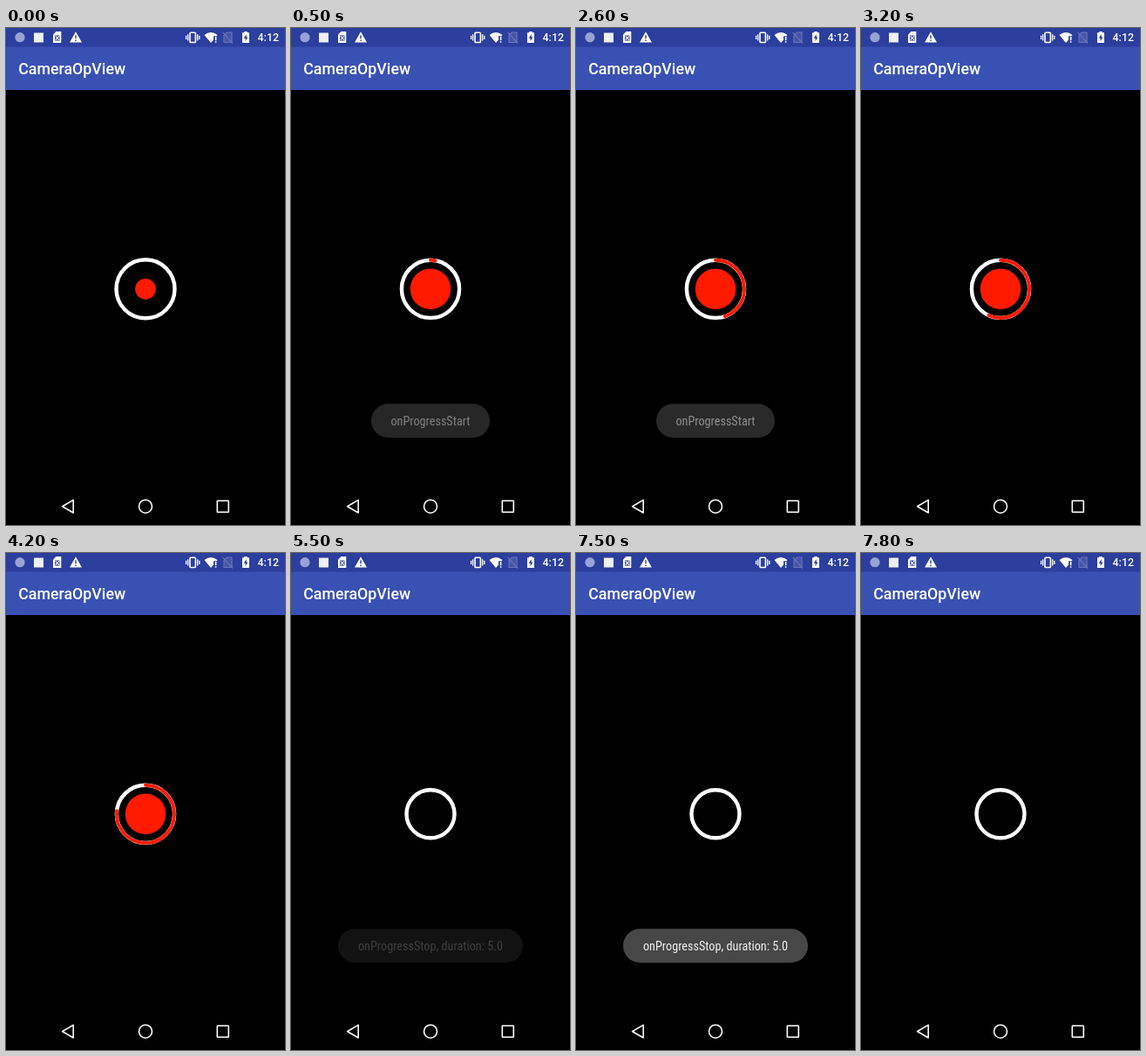
Recreate the animation shown at these times as an HTML page. Size 320 by 569 pixels, loop 8000 ms.

```html
<!DOCTYPE html>
<html lang="en">
<head>
<meta charset="utf-8">
<title>CameraOpView</title>
<style>
  html, body { margin: 0; height: 100%; overflow: hidden; background: #000; }
  svg { display: block; width: 100vw; height: 100vh; font-family: Roboto, sans-serif; }
  .line { fill: none; stroke: #fff; stroke-width: 1.6; }
  .toast text {
    font: 14.2px "Roboto Condensed", Roboto, sans-serif;
    font-stretch: condensed;
    fill: #fff;
    text-anchor: middle;
  }
  .toast rect { fill: #4c4c4c; }
</style>
</head>
<body>
<svg viewBox="0 0 320 569">
  <rect width="320" height="569"/>
  <rect width="320" height="71" fill="#3a51b4"/>
  <rect width="320" height="21.5" fill="#2c3e9e"/>
  <text x="14.2" y="53" font-size="17.8" font-weight="500" fill="#fff">CameraOpView</text>

  <!-- status bar -->
  <g fill="#fff">
    <circle cx="16" cy="10.7" r="5.6" fill="#98a2d4"/>
    <rect x="32" y="5.5" width="11" height="11" fill="#eef0fa"/>
    <path d="M57.5 4H63.3V17H54V7.5Z"/>
    <path d="M56 8.5H61.5V14.5H56Z" fill="#2c3e9e"/>
    <path d="M56.7 9.3L60.8 13.7M60.8 9.3L56.7 13.7" class="line" style="stroke-width:1.2"/>
    <path d="M80 4.3L87 16.5H73Z"/>
    <path d="M80 8.3V12.3M80 13.5V15" stroke="#2c3e9e" stroke-width="1.4"/>
    <rect x="211" y="5.3" width="6.4" height="11.2" rx=".8" class="line"/>
    <path d="M208.7 7.3V14.5M206.6 8.8V13M219.7 7.3V14.5M221.8 8.8V13" class="line" style="stroke-width:1.3"/>
    <path d="M227.5 8Q235 2.2 242.5 8L241.5 9.3H238V13.4L235 17Z"/>
    <path d="M240.6 10V14.2M240.6 15.3V16.8" class="line"/>
    <g stroke="#6974b8" fill="none" stroke-width="1.2">
      <path d="M253.5 5H259V16.5H250V8.5Z" fill="#4654a8"/>
      <path d="M248.7 5L260 17.5"/>
    </g>
    <path d="M271 5.3H273.3V4H276.7V5.3H279V17H271Z"/>
    <path d="M275.7 7L272.7 11.7H274.6V15.3L277.4 10.5H275.7Z" fill="#2c3e9e"/>
    <text x="313" y="15.3" font-size="12.4" font-weight="500" text-anchor="end">4:12</text>
  </g>

  <!-- record button -->
  <g transform="translate(160 298.8)" fill="none">
    <circle id="ring" stroke="#fff" stroke-width="4.4"/>
    <path id="arc" stroke="#ff1a00" stroke-width="3.9" stroke-linecap="round"/>
    <circle id="dot" fill="#ff1a00"/>
  </g>

  <g id="startToast" class="toast">
    <rect x="92" y="430.3" width="136" height="38.8" rx="19.4"/>
    <text x="160" y="454.8">onProgressStart</text>
  </g>
  <g id="stopToast" class="toast">
    <rect x="54" y="430.3" width="212" height="38.8" rx="19.4"/>
    <text x="160" y="454.8">onProgressStop, duration: 5.0</text>
  </g>

  <!-- navigation bar -->
  <g class="line">
    <path d="M64.6 547.7L77.2 540.4V555Z" stroke-linejoin="round"/>
    <circle cx="160" cy="547.7" r="7.5"/>
    <rect x="242.3" y="541.2" width="13" height="13" rx=".5"/>
  </g>
</svg>
<script>
const LOOP = 8000, START = 365, STOP = 5365;
const RING_IDLE = 27.5, RING_ACTIVE = 33.1, DOT = 23.3;
const $ = id => document.getElementById(id);
const ring = $("ring"), arc = $("arc"), dot = $("dot");
const progress = (t, from, length) => Math.min(1, Math.max(0, (t - from) / length));
const mix = (a, b, p) => a + (b - a) * p;

// Without a condensed face, a smaller regular one keeps the label inside its pill.
for (const label of document.querySelectorAll(".toast text")) {
  const room = label.previousElementSibling.width.baseVal.value - 38;
  if (label.getComputedTextLength() > room) label.style.fontSize = "12.6px";
}

function fadeToast(id, t, show) {
  const enter = progress(t, show, 400), leave = progress(t, show + 1955, 395);
  $(id).setAttribute("opacity", (1 - (1 - enter) ** 2) * (1 - leave ** 2));
}

function arcPath(angle, r) {
  const x = r * Math.sin(angle), y = -r * Math.cos(angle);
  return `M0 ${-r}A${r} ${r} 0 ${angle > Math.PI ? 1 : 0} 1 ${x} ${y}`;
}

function draw(t) {
  const release = progress(t, STOP, 100);
  const settle = progress(t, 0, 250);
  ring.setAttribute("r", mix(mix(33.5, RING_ACTIVE, settle), RING_IDLE, release));
  dot.setAttribute("r", mix(mix(11.8, DOT, settle), 0, release));

  const recording = t >= START && t < STOP;
  const angle = 2 * Math.PI * Math.min(.9999, progress(t, START, STOP - START));
  arc.setAttribute("d", recording ? arcPath(angle, RING_ACTIVE) : "");

  fadeToast("startToast", t, 383);
  fadeToast("stopToast", t, 5450);
}

const began = performance.now();
function tick() {
  draw((performance.now() - began) % LOOP);
  requestAnimationFrame(tick);
}
tick();
</script>
</body>
</html>
```
